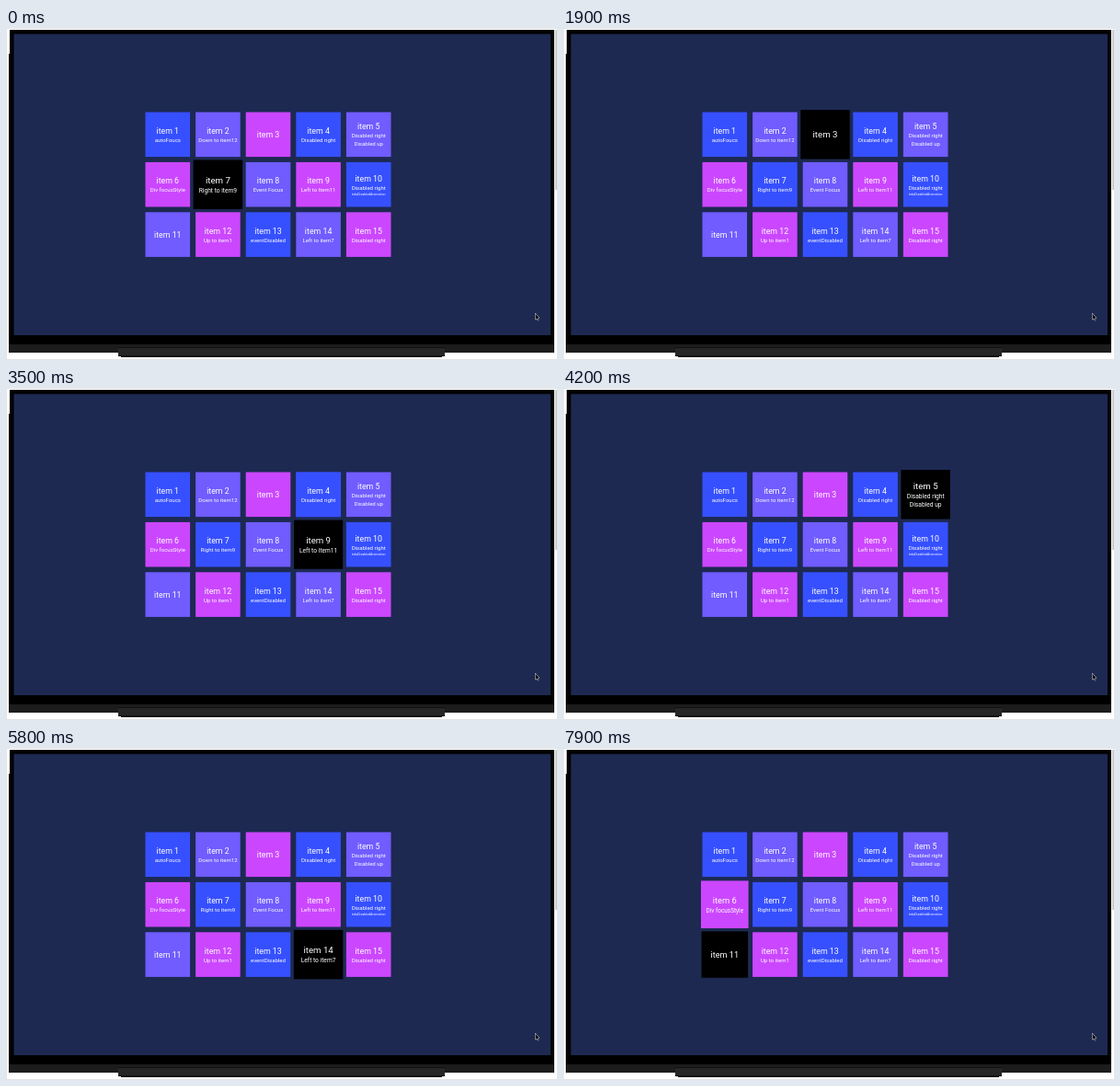
Animation of 599x361 px, one loop 8 s. Source, as an HTML page with a canvas:

```html
<!DOCTYPE html>
<html lang="en">
<head>
<meta charset="utf-8">
<title>Focus grid</title>
<style>
html, body { margin: 0; width: 100%; height: 100%; overflow: hidden; background: #fff; }
canvas { display: block; width: 599px; height: 361px; }
</style>
</head>
<body>
<canvas id="stage"></canvas>
<script>
const W = 599, H = 361, LOOP = 8000, STEP = 100, FADE = 240;
const FONT = 'Roboto, Arial, sans-serif';
const COLORS = ['#3650ff', '#705cff', '#cb47ff'];
const SIZE = 48.6, LEFT = 175.8, TOP = 115.8, PITCH_X = 54.6, PITCH_Y = 54.4, GROW = 0.1;

const NOTES = [
  ['autoFoucs'], ['Down to item12'], [], ['Disabled right'], ['Disabled right', 'Disabled up'],
  ['Div focusStyle'], ['Right to item9'], ['Event Focus'], ['Left to Item11'],
  ['Disabled right', 'trdaDisabledAnimation'],
  [], ['Up to item1'], ['eventDisabled'], ['Left to item7'], ['Disabled right']
];
const STILL = 10; // this item changes size without a transition

// [start time, focused item]
const PATH = [
  [-1000, 7], [300, 12], [700, 1], [1200, 2], [1600, 3], [2400, 4], [3300, 9],
  [3600, 10], [3900, 5], [4500, 10], [4900, 15], [5400, 14], [6000, 7],
  [6400, 9], [7000, 11], [7400, 6], [7800, 11]
];

const canvas = document.getElementById('stage');
const ctx = canvas.getContext('2d');
const dpr = window.devicePixelRatio || 1;
canvas.width = Math.round(W * dpr);
canvas.height = Math.round(H * dpr);

function rect(color, x, y, w, h) {
  ctx.fillStyle = color;
  ctx.fillRect(x, y, w, h);
}

function label(text, size, y) {
  ctx.font = `${size}px ${FONT}`;
  ctx.fillText(text, 0, y);
}

function ease(u) {
  u = Math.min(1, Math.max(0, u));
  return u * u * (3 - 2 * u);
}

function focusAt(t) {
  let k = PATH.length - 1;
  while (PATH[k][0] > t) k--;
  return { now: PATH[k][1], last: k ? PATH[k - 1][1] : 0, p: ease((t - PATH[k][0]) / FADE) };
}

function drawFrame() {
  rect('#fff', 0, 0, W, H);
  rect('#e4e4e4', 0, 0, W, 1);
  rect('#e4e4e4', 0, 0, 1, H);
  rect('#e4e4e4', 0, H - 1, W, 1);
  rect('#c9c9c9', 597, 2, 2, 174);
  rect('#000', 4, 2, 592, 343);
  rect('#000', 3, 28, 593, 317);
  rect('#1c1c1c', 3, 344, 593, 9);
  rect('#1d2951', 8.5, 6.5, 583.5, 327.5);
  rect('#101010', 122, 347, 355, 10);
  rect('#262626', 122, 348, 355, 8);
  rect('#111', 125, 356, 349, 2);
}

function drawItem(n, focus) {
  const i = n - 1, notes = NOTES[i];
  const active = n === focus.now;
  let amount = active ? focus.p : n === focus.last ? 1 - focus.p : 0;
  if (n === STILL) amount = active ? 1 : 0;
  const scale = 1 + GROW * amount;

  ctx.save();
  ctx.translate(LEFT + (i % 5) * PITCH_X, TOP + Math.floor(i / 5) * PITCH_Y);
  ctx.scale(scale, scale);
  rect(active ? '#000' : COLORS[i % 3], -SIZE / 2, -SIZE / 2, SIZE, SIZE);
  ctx.fillStyle = '#fff';
  const tiny = n === STILL;
  const base = tiny ? -3.6 : [3.3, -1.1, -5.6][notes.length];
  label('item ' + n, 8.8, base);
  if (notes[0]) label(notes[0], 6.05, base + 9.1);
  if (notes[1]) label(notes[1], tiny ? 3.6 : 6.05, base + (tiny ? 15.4 : 17.9));
  ctx.restore();
}

function drawCursor() {
  ctx.beginPath();
  [[575.6, 310.4], [575.6, 317], [577.1, 315.8], [578.2, 318], [579, 317.5], [578, 315.4], [579.6, 315.2]]
    .forEach(([x, y]) => ctx.lineTo(x, y));
  ctx.closePath();
  ctx.lineWidth = 1;
  ctx.strokeStyle = '#dfe2ea';
  ctx.stroke();
  ctx.fillStyle = '#000';
  ctx.fill();
}

function draw(time) {
  const t = Math.floor((time % LOOP) / STEP) * STEP;
  const focus = focusAt(t);
  ctx.setTransform(dpr, 0, 0, dpr, 0, 0);
  ctx.textAlign = 'center';
  ctx.textBaseline = 'alphabetic';
  drawFrame();
  for (let n = 1; n <= NOTES.length; n++) {
    if (n !== focus.now) drawItem(n, focus);
  }
  drawItem(focus.now, focus);
  drawCursor();
}

let start;
function tick(now) {
  if (start === undefined) start = now;
  draw(Math.max(0, now - start));
  requestAnimationFrame(tick);
}
draw(0);
requestAnimationFrame(tick);
</script>
</body>
</html>
```
